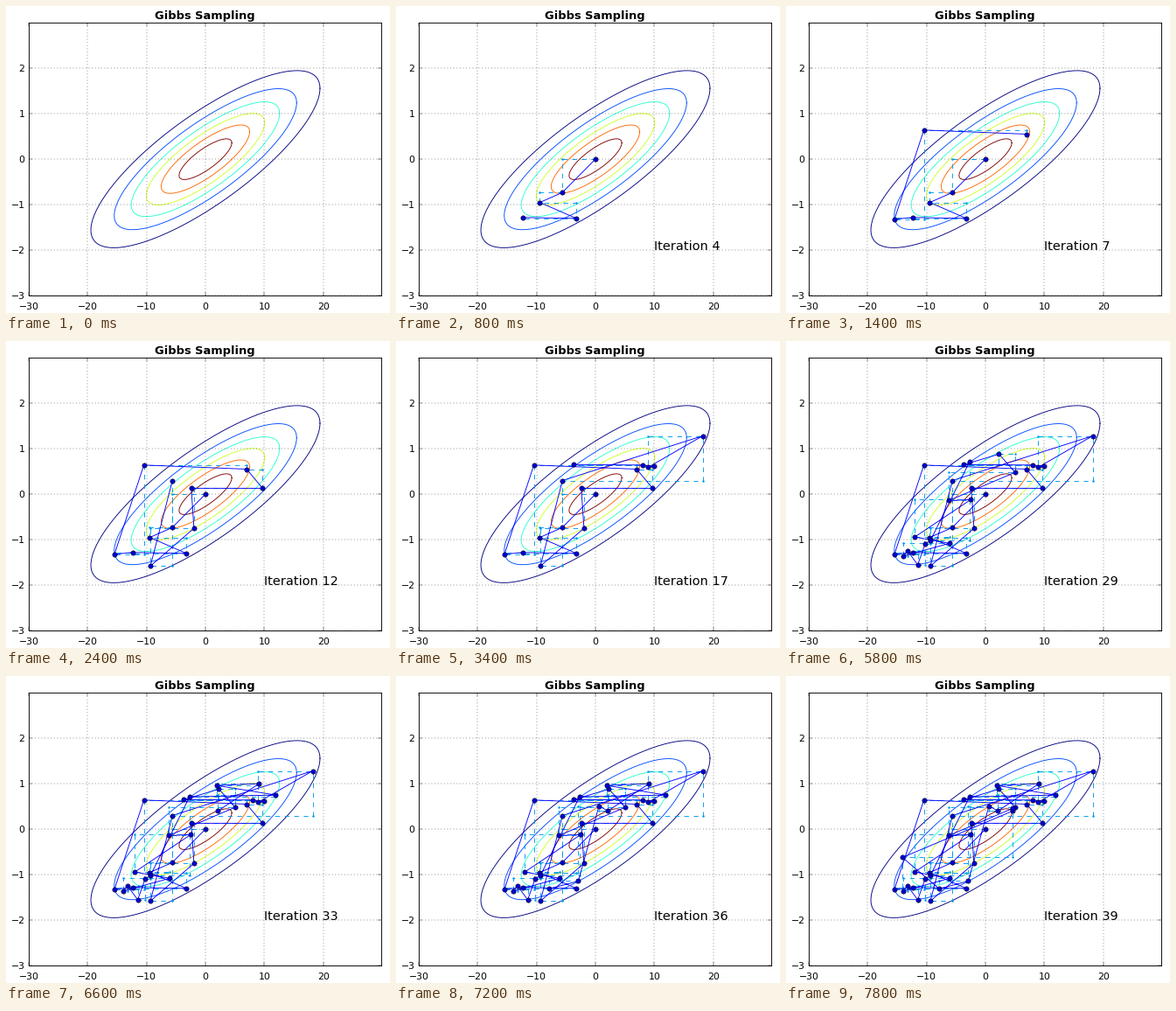
These frames come from a looping animation (439x351 px, 8 s). A matplotlib script:

```python
import numpy as np
import matplotlib.pyplot as plt
from matplotlib.animation import FuncAnimation

W, H, DPI = 439, 351, 65
STEPS, INTERVAL = 40, 200
SX, SY, RHO = 10, 1, 0.8

plt.rcParams.update({
    "font.family": "DejaVu Sans",
    "font.size": 12,
    "axes.linewidth": 1.0,
    "axes.axisbelow": False,
    "lines.scale_dashes": False,
})

# Successive states of the chain, starting at the mean.
chain = np.array([
    (0, 0), (-5.65, -0.735), (-9.45, -0.95), (-3.25, -1.3),
    (-12.4, -1.28), (-15.45, -1.32), (-10.45, 0.64), (7.0, 0.55),
    (9.7, 0.13), (-2.4, 0.13), (-1.95, -0.75), (-9.35, -1.58),
    (-5.6, 0.3), (18.2, 1.28), (8.95, 0.59), (10.0, 0.61),
    (7.95, 0.64), (-3.65, 0.65), (2.3, 0.88), (5.05, 0.48),
    (-6.2, -0.14), (-2.5, -0.12), (-12.0, -0.94), (-6.1, -1.08),
    (-14.0, -1.36), (-13.2, -1.25), (-11.5, -1.55), (-10.25, -1.1),
    (-9.35, -1.02), (-2.7, 0.71), (11.9, 0.75), (1.95, 0.96),
    (9.1, 1.0), (2.1, 0.4), (0.6, 0.51), (-2.9, -1.14),
    (-7.85, -1.31), (-14.1, -0.62), (4.65, 0.4), (4.55, 0.46),
])

# Each Gibbs step updates x first, then y.
stairs = np.empty((2 * len(chain) - 1, 2))
stairs[::2] = chain
stairs[1::2, 0] = chain[1:, 0]
stairs[1::2, 1] = chain[:-1, 1]

fig = plt.figure(figsize=((W + 0.01) / DPI, (H + 0.01) / DPI), dpi=DPI,
                 facecolor="white")
left, right, top, bottom = 26, 429.3, 19.5, 331.3
ax = fig.add_axes([left / W, 1 - bottom / H,
                   (right - left) / W, (bottom - top) / H])
ax.set_xlim(-30, 29.9)
ax.set_ylim(-3, 2.99)
ax.set_xticks(range(-30, 21, 10))
ax.set_yticks(range(-3, 3))
ax.tick_params(direction="in", length=4, width=0.5, top=True, right=True)
ax.tick_params(axis="x", pad=8)
ax.tick_params(axis="y", pad=5)
ax.grid(color="black", linewidth=0.5, linestyle=(0, (1, 3)))
ax.set_title("Gibbs Sampling", fontsize=14.4, fontweight="bold", pad=5)


def draw_contours():
    """Level curves of the correlated normal density."""
    peak = 1 / (2 * np.pi * SX * SY * np.sqrt(1 - RHO ** 2))
    levels = np.arange(1, 7) * 0.004
    t = np.linspace(0, 2 * np.pi, 300)
    u = np.cos(t)
    v = RHO * u + np.sqrt(1 - RHO ** 2) * np.sin(t)
    for i, level in enumerate(levels):
        r = np.sqrt(-2 * np.log(level / peak))
        ax.plot(r * SX * u, r * SY * v, color=plt.cm.jet(i / 5), lw=1)


draw_contours()
steps, = ax.plot([], [], color="#0099f0", lw=1, linestyle=(0, (6, 6)),
                 marker="o", ms=2.8, mew=0)
path, = ax.plot([], [], color="#0000ff", lw=1, marker="o", ms=6,
                mfc="#0000d0", mec="black", mew=0.5)
label = ax.text(10, -2, "", fontsize=16)


def update(n):
    shown = n + 1 if n else 0
    path.set_data(*chain[:shown].T)
    steps.set_data(*stairs[:max(0, 2 * shown - 1)].T)
    label.set_text(f"Iteration {n}" if n else "")
    return steps, path, label


anim = FuncAnimation(fig, update, frames=STEPS, interval=INTERVAL,
                     init_func=lambda: update(0), repeat=True,
                     repeat_delay=0, blit=False)
plt.show()
```
